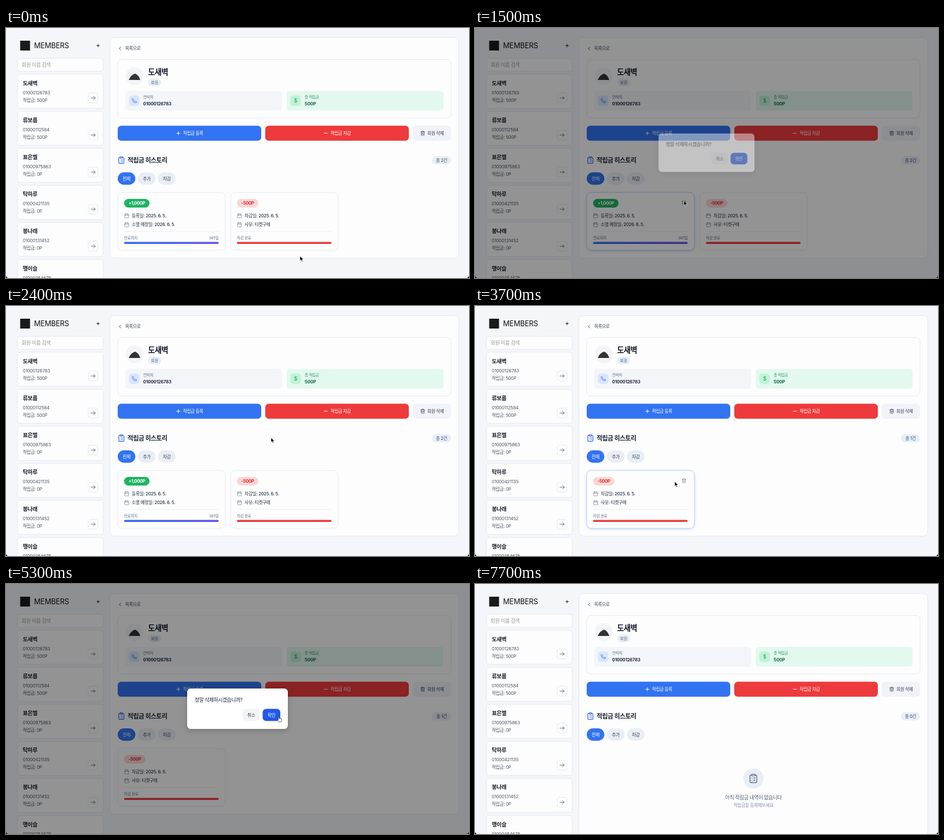
An HTML page for the animation above (7.8 s loop, 800 by 433 pixels).

```html
<!DOCTYPE html>
<html lang="ko">
<head>
<meta charset="utf-8">
<title>Members</title>
<style>
html, body { margin: 0; width: 100%; height: 100%; overflow: hidden; background: #f4f6fa; }
svg.stage { display: block; width: 100vw; height: 100vh; }
text { font: 400 7.7px Inter, 'Noto Sans CJK KR', 'Noto Sans CJK', sans-serif; letter-spacing: -.05em; fill: #374151; }
.num { letter-spacing: -.02em; }
.mid { text-anchor: middle; }
.end { text-anchor: end; }
.xs { font-size: 6.6px; fill: #64748b; }
.lg { font-size: 8.8px; }
.semi { font-weight: 500; }
.bold { font-weight: 700; }
.white { fill: #fff; }
.icon { fill: none; stroke: currentColor; stroke-width: 2; stroke-linecap: round; stroke-linejoin: round; }
.line { fill: none; stroke-width: 1; stroke-linecap: round; stroke-linejoin: round; }
.box { fill: #fdfdfe; stroke: #e2e7ef; stroke-width: .9; }

.two, .one, .none, .some, .slide, .hover, .mask, .modal, .cursor, .arrow, .hand {
  animation: 7.8s step-end infinite;
}
.two { animation-name: two; }
.one { animation-name: one; }
.none { animation-name: none-left; }
.some { animation-name: some; }
.slide { animation-name: slide; }
.mask { animation-name: mask; }
.modal { animation-name: modal; transform-origin: 400px 216px; }
.cursor { animation-name: move; }
.arrow { animation-name: arrow; }
.hand { animation-name: hand; }
.hover.first { animation-name: hover-first; }
.hover.second { animation-name: hover-second; }
.hover rect { fill: #fdfdfe; stroke: #bfd6fb; filter: drop-shadow(0 1.5px 2px #3b82f64d); }

@keyframes two { 0% { opacity: 1 } 35.89%, 100% { opacity: 0 } }
@keyframes one { 0% { opacity: 0 } 35.89% { opacity: 1 } 74.35%, 100% { opacity: 0 } }
@keyframes none-left { 0% { opacity: 0 } 74.35%, 100% { opacity: 1 } }
@keyframes some { 0% { opacity: 1 } 74.35%, 100% { opacity: 0 } }
@keyframes slide { 0% { transform: none } 35.89%, 100% { transform: translateX(-195px) } }
@keyframes hover-first { 0% { opacity: 0 } 6.41% { opacity: 1 } 21.79%, 100% { opacity: 0 } }
@keyframes hover-second { 0% { opacity: 0 } 43.58% { opacity: 1 } 62.82%, 100% { opacity: 0 } }
@keyframes mask { 0% { opacity: 0 } 19.23% { opacity: 1 } 30.76% { opacity: 0 } 58.97% { opacity: 1 } 71.79%, 100% { opacity: 0 } }
@keyframes modal {
  0% { opacity: 0; transform: scale(.9) }
  19.23%, 58.97% { opacity: .45; transform: scale(.953) }
  20.51%, 60.25% { opacity: 1; transform: none }
  30.76%, 71.79%, 100% { opacity: 0; transform: scale(.9) }
}
@keyframes move {
  0% { transform: translate(508px, 395px); opacity: 1 }
  2.56% { transform: translate(508px, 395px); animation-timing-function: steps(4) }
  7.69% { transform: translate(361px, 299px) }
  20.51% { transform: translate(361px, 299px); animation-timing-function: steps(5) }
  26.92% { transform: translate(458px, 228px) }
  37.17% { transform: translate(458px, 228px); animation-timing-function: steps(6) }
  44.87% { transform: translate(345px, 304px) }
  50% { transform: translate(345px, 304px); animation-timing-function: steps(2) }
  52.56% { transform: translate(361px, 299px) }
  60.25% { transform: translate(361px, 299px); animation-timing-function: steps(6) }
  67.94% { transform: translate(470px, 229px) }
  74.35% { transform: translate(470px, 229px); animation-timing-function: steps(3) }
  78.2% { transform: translate(511px, 236px); opacity: 1 }
  88.46%, 100% { transform: translate(511px, 236px); opacity: 0 }
}
@keyframes arrow { 0% { opacity: 1 } 25.64% { opacity: 0 } 30.76% { opacity: 1 } 66.66% { opacity: 0 } 71.79%, 100% { opacity: 1 } }
@keyframes hand { 0% { opacity: 0 } 25.64% { opacity: 1 } 30.76% { opacity: 0 } 66.66% { opacity: 1 } 71.79%, 100% { opacity: 0 } }
</style>
</head>
<body>
<svg class="stage" viewBox="0 0 800 433" preserveAspectRatio="none">
  <defs>
    <linearGradient id="fade"><stop stop-color="#2f6cf0"/><stop offset="1" stop-color="#6552ee"/></linearGradient>
    <symbol id="trash" viewBox="0 0 24 24"><path class="icon" d="M3 6h18M19 6v14q0 2-2 2H7q-2 0-2-2V6M8 6V4q0-2 2-2h4q2 0 2 2v2M10 11v6M14 11v6"/></symbol>
    <symbol id="clipboard" viewBox="0 0 24 24"><path class="icon" d="M8 4H6q-2 0-2 2v14q0 2 2 2h12q2 0 2-2V6q0-2-2-2h-2M9 2h6q1 0 1 1v2q0 1-1 1H9q-1 0-1-1V3q0-1 1-1zM12 11h4M12 16h4M8 11h.01M8 16h.01"/></symbol>
    <symbol id="calendar" viewBox="0 0 24 24"><path class="icon" d="M8 2v4M16 2v4M3 10h18M5 4h14q2 0 2 2v14q0 2-2 2H5q-2 0-2-2V6q0-2 2-2z"/></symbol>
    <symbol id="phone" viewBox="0 0 24 24"><path class="icon" d="M22 17v3a2 2 0 0 1-2.2 2A20 20 0 0 1 2 4.200a2 2 0 0 1 2-2.200h3a2 2 0 0 1 2 1.700l1 3.800-2.200 2.200a16 16 0 0 0 6 6l2.200-2.200 4 1a2 2 0 0 1 2 2.500z"/></symbol>
  </defs>

  <rect width="800" height="433" fill="#f4f6fa"/>

  <!-- sidebar -->
  <rect x="24.500" y="22" width="17" height="17" fill="#1a1a1a"/>
  <text x="48.500" y="34.700" style="font-size:12.4px;letter-spacing:-.01em;fill:#111">MEMBERS</text>
  <path class="line" d="M156.800 30.500h4.600M159.100 28.200v4.600" stroke="#222"/>
  <rect class="box" x="20" y="52.500" width="148" height="22.500" rx="4"/>
  <text class="lg" x="27" y="66.800" style="fill:#9a9a9a">회원 이름 검색</text>
  <g id="members"></g>

  <!-- panel -->
  <rect class="box" x="179.700" y="16.500" width="602.600" height="382" rx="8"/>
  <rect class="box none" x="179.700" y="16.500" width="602.600" height="440" rx="8"/>
  <path class="line" d="M198.300 33l-2.500 2.500 2.500 2.500" stroke="#374151"/>
  <text class="semi" x="205.800" y="38.200">목록으로</text>

  <!-- profile -->
  <rect class="box" x="193" y="54.300" width="576" height="101.700" rx="8"/>
  <circle cx="222" cy="83.500" r="15.500" fill="#f3f4f6"/>
  <path d="M212 90q4-9 11-11 6 2 9 11z" fill="#333"/>
  <text class="bold" x="245.600" y="81" style="font-size:13.1px;fill:#111827">도새벽</text>
  <rect x="245.500" y="87.500" width="22.500" height="13.500" rx="6.700" fill="#e9eef6"/>
  <text class="mid semi" x="256.700" y="96.800" style="font-size:7px;fill:#5b6b85">회원</text>
  <rect x="206" y="109" width="271" height="34" rx="5" fill="#f3f5f9"/>
  <rect x="212.500" y="117" width="18" height="18" rx="5" fill="#d9e6fd"/>
  <use href="#phone" x="217" y="121.500" width="9" height="9" color="#3269ea"/>
  <text class="xs" x="237" y="122">연락처</text>
  <text class="bold num" x="237" y="133.500" style="font-size:7.5px;fill:#1e293b">01000126783</text>
  <rect x="485" y="109" width="271" height="34" rx="5" fill="#e3f8ee"/>
  <rect x="491.500" y="117" width="18" height="18" rx="5" fill="#bff3d6"/>
  <text class="mid" x="500.500" y="129.300" style="font-size:9px;fill:#16a05c">$</text>
  <text class="xs" x="516" y="122" style="fill:#2f9468">총 적립금</text>
  <text class="bold num" x="516" y="133.500" style="font-size:7.7px;fill:#0b6b45">500P</text>

  <!-- actions -->
  <rect x="193" y="169.300" width="248" height="26" rx="6" fill="#3273f1"/>
  <path class="line" d="M295 182.300h5.600M297.800 179.500v5.600" stroke="#fff"/>
  <text class="semi white" x="305.700" y="185">적립금 등록</text>
  <rect x="448" y="169.300" width="248" height="26" rx="6" fill="#ee3a3c"/>
  <path class="line" d="M549.800 182.300h5.600" stroke="#fff"/>
  <text class="semi white" x="560.700" y="185">적립금 차감</text>
  <rect x="702.500" y="169.300" width="66.500" height="26" rx="6" fill="#f1f3f8"/>
  <use href="#trash" x="715.500" y="177.700" width="9" height="9" color="#374151"/>
  <text class="semi" x="728" y="185">회원 삭제</text>

  <!-- history -->
  <use href="#clipboard" x="192.500" y="222" width="13.500" height="13.500" color="#2f62ea"/>
  <text x="210" y="232.900" style="font-size:10.9px;font-weight:600;fill:#1b2433">적립금 히스토리</text>
  <rect x="736" y="222" width="33" height="14.300" rx="7.100" fill="#e9eef6"/>
  <g class="mid">
    <text class="semi two" x="752.500" y="231.900" style="fill:#475a78">총 2건</text>
    <text class="semi one" x="752.500" y="231.900" style="fill:#475a78">총 1건</text>
    <text class="semi none" x="752.500" y="231.900" style="fill:#475a78">총 0건</text>
  </g>
  <rect x="193" y="250" width="30.500" height="21.500" rx="10.700" fill="#3273f1"/>
  <rect x="228" y="250" width="30.500" height="21.500" rx="10.700" fill="#e9eef5"/>
  <rect x="262.500" y="250" width="30.500" height="21.500" rx="10.700" fill="#e9eef5"/>
  <text class="mid semi white" x="208.200" y="263.500">전체</text>
  <text class="mid semi" x="243.200" y="263.500">추가</text>
  <text class="mid semi" x="277.700" y="263.500">차감</text>
  <g id="cards"></g>

  <g class="none">
    <circle cx="481" cy="336.800" r="17.500" fill="#e9eef6"/>
    <use href="#clipboard" x="472.300" y="328" width="17.500" height="17.500" color="#64748b"/>
    <text class="mid lg" x="481" y="372.700" style="fill:#526079">아직 적립금 내역이 없습니다</text>
    <text class="mid" x="481" y="386" style="fill:#8492a8">적립금을 등록해보세요</text>
  </g>

  <!-- dialog -->
  <rect class="mask" width="800" height="433" fill="#000" fill-opacity=".42"/>
  <g class="modal">
    <rect x="313" y="181" width="174" height="70" rx="6" fill="#fff" style="filter:drop-shadow(0 3px 5px #0003)"/>
    <text class="lg" x="326" y="204.100" style="fill:#1f2937">정말 삭제하시겠습니까?</text>
    <rect x="409" y="216.300" width="29.500" height="21" rx="6" fill="#f3f4f6"/>
    <text class="mid" x="423.700" y="229.600">취소</text>
    <rect x="443.500" y="216.300" width="30.500" height="21" rx="6" fill="#2158e6"/>
    <text class="mid semi white" x="458.700" y="229.600">확인</text>
  </g>

  <path d="M0 428q0 5 5 5H0zM800 428q0 5-5 5h5z" fill="#000"/>

  <g class="cursor">
    <path class="arrow" d="M0 0v8.300l1.900-1.700 1.300 2.900 1.400-.6-1.300-2.800h2.500z" fill="#000" stroke="#fff" stroke-width=".6"/>
    <path class="hand" d="M.3 1q.9-1 1.700 0v3q1-.7 1.500.2 1-.5 1.400.4 1.300-.3 1.300 1V7.500q0 2-1.500 2.500H1.600Q.6 9-1.400 6.400q.5-1.300 1.700 0z" fill="#fff" stroke="#111" stroke-width=".7"/>
  </g>
</svg>

<script>
const members = [
  ['도새벽', '01000126783', 500],
  ['류보름', '01000112584', 500],
  ['표은별', '01000975863', 0],
  ['탁하루', '01000421135', 0],
  ['봉나래', '01000131452', 0],
  ['맹이슬', '01000354678', 0],
];

const memberRow = ([name, phone, points], i) => `
  <g transform="translate(20 ${80 + i * 64.2})">
    <rect class="box" width="148" height="59" rx="5"/>
    <text class="bold" x="9" y="18.700" style="font-size:9.600px;fill:#1a1f2b">${name}</text>
    <text class="num" x="9" y="34.700" style="fill:#4b5563">${phone}</text>
    <text x="9" y="47.700" style="letter-spacing:-.035em;fill:#4b5563">적립금: ${points}P</text>
    <rect class="box" x="122" y="32.700" width="17" height="17" rx="4"/>
    <path class="line" d="M126.800 41.200h7.400M131.200 38.200l3 3-3 3" stroke="#6b7280"/>
  </g>`;

const card = c => `
  <g class="${c.group}"><g class="${c.motion}">
  <g transform="translate(${c.x} 285)">
    <rect class="box" width="186" height="100" rx="8"/>
    <g class="hover ${c.hover}">
      <rect width="186" height="100" rx="8"/>
      <use href="#trash" x="163.500" y="13" width="9" height="9" color="#7c8aa5"/>
    </g>
    <rect x="11" y="11" width="${c.width}" height="15" rx="7.500" fill="${c.badge}"/>
    <text class="bold mid" x="${11 + c.width / 2}" y="21.300" style="fill:${c.ink}">${c.amount}</text>
    ${c.rows.map((row, i) => `
      <use href="#calendar" x="11" y="${35.7 + i * 15.4}" width="9" height="9" color="#75839a"/>
      <text class="semi" x="24.200" y="${43 + i * 15.4}" style="letter-spacing:-.04em;fill:#283244">${row}</text>`).join('')}
    <path d="M11 67.500h163.500" stroke="#edf0f5"/>
    <text class="xs" x="11" y="81.400">${c.label}</text>
    <text class="xs end" x="174.500" y="81.400">${c.left}</text>
    <rect x="11" y="85.500" width="163.500" height="3.600" rx="1.800" fill="${c.bar}"/>
  </g></g></g>`;

const cards = [
  { group: 'two', motion: '', hover: 'first', x: 193, width: 44, badge: '#1eb562', ink: '#fff', amount: '+1,000P',
    rows: ['등록일: 2025. 6. 5.', '소멸 예정일: 2026. 6. 5.'], label: '만료까지', left: '365일', bar: 'url(#fade)' },
  { group: 'some', motion: 'slide', hover: 'second', x: 388, width: 37, badge: '#fcd6d6', ink: '#dc3434', amount: '-500P',
    rows: ['차감일: 2025. 6. 5.', '사유: 티켓구매'], label: '차감 완료', left: '', bar: '#ee3a3c' },
];

document.getElementById('members').innerHTML = members.map(memberRow).join('');
document.getElementById('cards').innerHTML = cards.map(card).join('');
</script>
</body>
</html>
```
